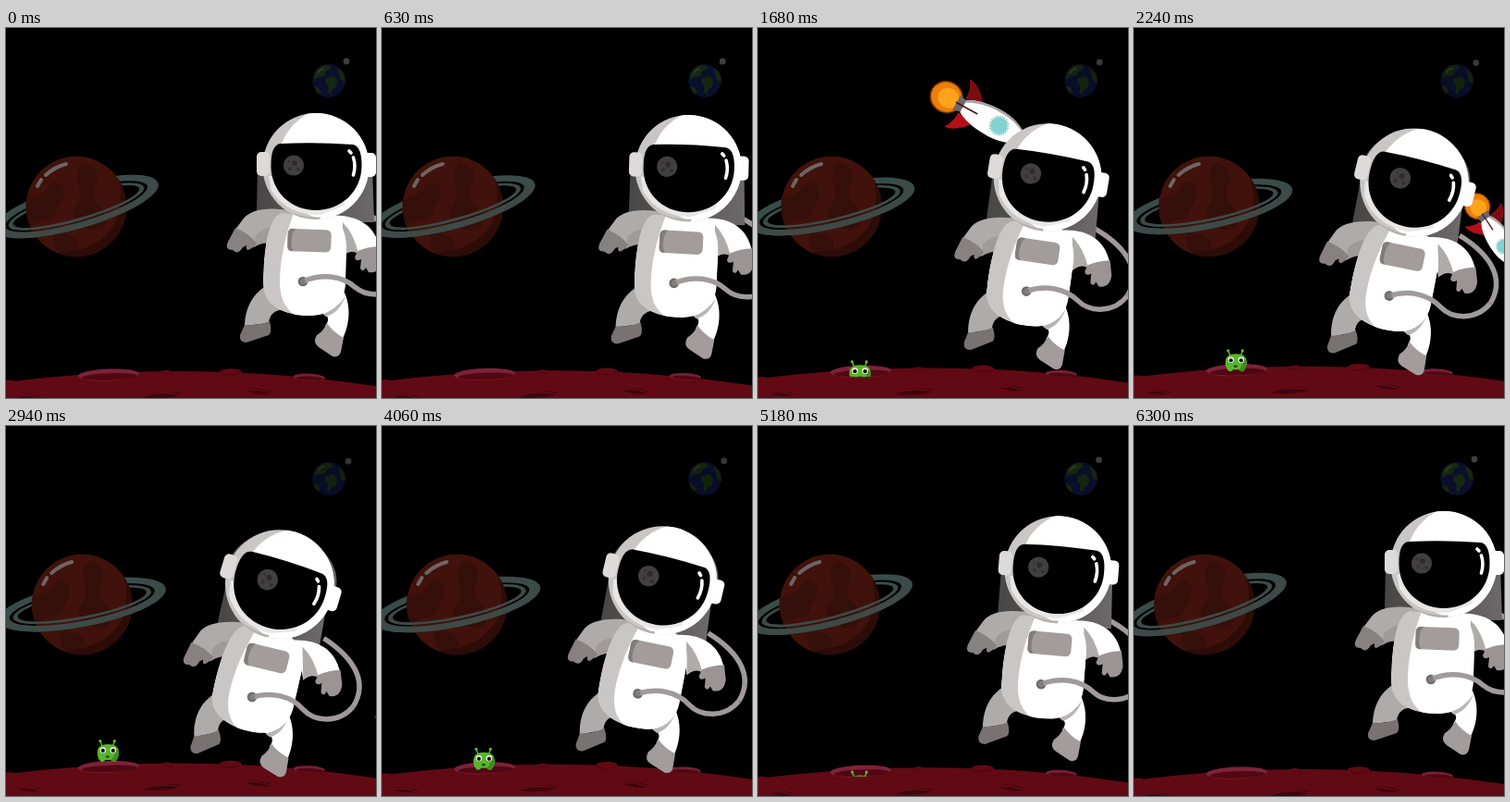
Recreate the animation shown at these times as an HTML page. Size 400 by 400 pixels, loop 6.37 s.

```html
<!DOCTYPE html>
<html lang="en">
<head>
<meta charset="utf-8">
<title>Astronaut</title>
<style>
  html, body { margin: 0; width: 100%; height: 100%; overflow: hidden; background: #000; }
  svg { display: block; width: 100vw; height: 100vh; }
</style>
</head>
<body>
<svg viewBox="0 0 400 400">
  <defs>
    <clipPath id="helmetClip"><circle cx="335" cy="149.5" r="57.5"/></clipPath>
    <clipPath id="torsoClip"><path id="torsoShape" d="M298 200C281 204 278 250 278 277C278 301 301 311 328 311C352 311 367 297 367 274L368 238C368 220 361 207 350 203Z"/></clipPath>
    <clipPath id="globeClip"><circle r="54.5"/></clipPath>
    <clipPath id="earthClip"><circle r="18"/></clipPath>
    <clipPath id="holeClip"><path d="M60 300H160V377H142A30 3.6 0 0 1 82 377H60Z"/></clipPath>
    <clipPath id="frontClip"><path d="M-110 0H110V60H-110Z"/></clipPath>
    <linearGradient id="packFill">
      <stop offset="0" stop-color="#484646"/><stop offset="1" stop-color="#6d6869"/>
    </linearGradient>
    <path id="rings" fill-rule="evenodd" d="M-92 0A92 24 0 0 1 92 0A92 24 0 0 1-92 0ZM-80 0A80 17.5 0 0 0 80 0A80 17.5 0 0 0-80 0ZM-76 0A76 15.5 0 0 1 76 0A76 15.5 0 0 1-76 0ZM-71 0A71 12.8 0 0 0 71 0A71 12.8 0 0 0-71 0Z"/>
  </defs>
  <rect width="400" height="400"/>

  <g id="earth">
    <g clip-path="url(#earthClip)">
      <circle r="18" fill="#0d1236"/>
      <g fill="#1b2f10">
        <path d="M-15-9Q-10-18 0-17L3-13L-3-10L-5-5L-11-4L-16-1Z"/>
        <path d="M-3-3L5-5L9 0L8 7L4 9L2 15L-1 12L0 6L-4 2Z"/>
        <path d="M9-14L17-8L18 2L13-1L11-7Z"/>
        <path d="M-16 6L-10 8L-8 14L-13 14Z"/>
      </g>
      <path d="M-12-8Q-10-12-6-13" fill="none" stroke="#3b4a3b" stroke-width="1.6" stroke-linecap="round"/>
    </g>
    <circle cx="19" cy="-21" r="3.4" fill="#4c4c4c"/>
  </g>

  <g id="planet">
    <use id="ringBack" href="#rings" fill="#3a4c49"/>
    <g clip-path="url(#globeClip)">
      <circle r="54.5" fill="#40120b"/>
      <g fill="#350f0a">
        <path d="M-55-8Q-36-10-30-22Q-22-32-14-20Q-12-8-20 2Q-24 16-36 14L-55 22Z"/>
        <path d="M8-48Q26-42 22-26Q14-14 24-2Q36 8 30 22Q18 30 6 20Q-8 16-2 2Q8-10 2-24Q-2-40 8-48Z"/>
        <path d="M-24 30Q-8 26 2 38Q4 50-10 54Q-26 50-24 30Z"/>
      </g>
      <path d="M32-55Q58-20 42 18Q24 48-20 50V60H60V-55Z" fill="#270a07" opacity=".75"/>
    </g>
    <path d="M-42-22L-38-29M-33-34Q-23-43-11-46" fill="none" stroke="#6c6564" stroke-width="4" stroke-linecap="round"/>
    <g id="ringFront" clip-path="url(#frontClip)"><use href="#rings" fill="#3d4a47"/></g>
  </g>

  <g id="ground">
    <circle cx="185" cy="1816" r="1445" fill="#610a13"/>
    <g fill="#610a13">
      <ellipse cx="4" cy="384.500" rx="9" ry="3.800"/>
      <ellipse cx="243" cy="372" rx="12" ry="3.800"/>
      <ellipse cx="174" cy="372" rx="6" ry="2"/>
    </g>
    <path d="M234 374Q243 377 253 373M169 373.500H179" fill="none" stroke="#490710" stroke-width="1"/>
    <g fill="#3e050b">
      <ellipse cx="169" cy="397" rx="21" ry="3.200" transform="rotate(-4 169 397)"/>
      <ellipse cx="274" cy="393" rx="13" ry="2.800" transform="rotate(7 274 393)"/>
      <ellipse cx="26" cy="399" rx="13" ry="2.400" transform="rotate(4 26 399)"/>
    </g>
    <path d="M149 398Q169 392 190 396.500M262 391Q275 390 286 395M14 398Q26 395.500 38 401" fill="none" stroke="#76101c" stroke-width="1"/>
    <g transform="rotate(-2 111 375)">
      <ellipse cx="111" cy="375" rx="33" ry="6.500" fill="#7d2238"/>
      <ellipse cx="112" cy="377" rx="30" ry="3.800" fill="#510812"/>
    </g>
    <g transform="rotate(3 328 377)">
      <ellipse cx="328" cy="377.500" rx="17" ry="3.800" fill="#762035"/>
      <ellipse cx="329" cy="378.700" rx="15" ry="2.200" fill="#510812"/>
    </g>
    <g clip-path="url(#holeClip)">
      <g id="alien">
        <path d="M-6 8L-8.500 1.500M5 8L7 1.500" stroke="#58b52b" stroke-width="1.500"/>
        <circle cx="-8.500" cy="1.500" r="1.500" fill="#6cc038"/><circle cx="7" cy="1.500" r="1.500" fill="#6cc038"/>
        <path d="M-11.500 13Q-11 5 0 5Q11 5 11.500 13Q12 20 8 23.500Q5 25 3 22L-3 22Q-5 25-8 23.500Q-12 20-11.500 13Z" fill="#58b52b"/>
        <path d="M11.500 13Q12 20 8 23.500Q5 25 3 22Q8 18 8 9Z" fill="#3d8d20"/>
        <circle cx="-5.500" cy="11.500" r="3.300" fill="#e6efe0"/><circle cx="5.500" cy="11.500" r="3.300" fill="#e6efe0"/>
        <circle cx="-5.500" cy="12" r="2.100" fill="#111"/><circle cx="5.500" cy="12" r="2.100" fill="#111"/>
        <ellipse cx="-.5" cy="18.500" rx="2.200" ry="1.300" fill="#1c4a10"/>
      </g>
    </g>
  </g>

  <g id="rocket">
    <ellipse cx="-78" rx="21" ry="20" fill="#ec7f0b" stroke="#8f3a07" stroke-width="2.500" stroke-dasharray="2 1.500"/>
    <ellipse cx="-75" rx="14" ry="13" fill="#ffa31a"/>
    <path d="M-52-8L-63-11V11L-52 8Z" fill="#6d6768"/>
    <path d="M-32-15Q-48-35-62-35Q-54-24-55-10ZM-32 15Q-48 35-62 35Q-54 24-55 10Z" fill="#b30f19"/>
    <path d="M-32-15Q-48-35-62-35Q-54-24-55-10Z" fill="#7b0c14"/>
    <path d="M41 0C28-14 10-19-8-19C-30-19-45-14-53-9V9C-45 14-30 19-8 19C10 19 28 14 41 0Z" fill="#fff"/>
    <path d="M41 0C28-14 10-19-8-19C-30-19-45-14-53-9V-5C-40-13-26-16-8-16C10-16 26-12 41 0Z" fill="#aaa4a5"/>
    <path d="M41 0Q37-4.500 32-7.500Q35 0 32 7.500Q37 4.500 41 0Z" fill="#c4121d"/>
    <path d="M-64 0H-32" stroke="#4d1418" stroke-width="2"/>
    <circle r="11" fill="#82d2d2"/>
    <circle r="12" fill="none" stroke="#6fb4b6" stroke-width="1.800" stroke-dasharray="1.500 1.500"/>
  </g>

  <g id="astronaut">
    <g id="hoseBack"><path d="M430 262C440 236 425 212 384 196" fill="none" stroke="#a09a9b" stroke-width="5.500"/></g>
    <ellipse id="cap" ry="48" fill="url(#packFill)"/>
    <g id="pack"><path d="M272 150H396L398 210H271V196Z" fill="url(#packFill)"/></g>
    <g id="armL">
      <path d="M312 198C286 193 264 195 256 207L247 219L268 237C275 231 281 231 290 234L306 218Z" fill="#b0abab"/>
      <path d="M270 224Q280 214 292 216L290 234Q280 230 268 237Z" fill="#a09a9b"/>
      <path d="M248 216L240 231Q236 240 245 240Q251 246 256 237L260 235Q259 242 264 239Q268 237 271 233Q263 222 248 216Z" fill="#878182"/>
    </g>
    <g id="armR">
      <path d="M350 203C378 201 399 212 404 238L381 244C377 240 372 240 364 246L360 215Z" fill="#fff"/>
      <path d="M364 210Q376 222 381 244Q373 239 364 246Z" fill="#b0abab"/>
      <path d="M404.500 236Q392 236 380 241L377 248Q378 253 384 250L383 260Q386 265 389 259L392 264Q404 266 406 252Z" fill="#9a9495"/>
    </g>
    <g id="legL">
      <path d="M286 276C270 284 259 298 258 322L284 319C285 309 291 304 304 304Z" fill="#b0abab"/>
      <path d="M258 321Q272 322 285 317Q288 329 284 332L260 340Q252 340 253 332Z" fill="#787273"/>
    </g>
    <g id="legR">
      <path d="M338 306L366 286C372 300 373 318 363 338L345 322C350 316 350 310 338 306Z" fill="#fff"/>
      <path d="M341 308Q358 304 367 290Q360 308 346 312Z" fill="#bab5b5"/>
      <path d="M347 319Q343 328 336 332Q331 340 338 345L353 355Q360 357 362 350L365 335Q354 329 347 319Z" fill="#a29c9d"/>
    </g>
    <g clip-path="url(#torsoClip)">
      <use href="#torsoShape" fill="#cbc6c6"/>
      <path d="M312 198C303 220 296 250 296 274C296 296 304 306 318 314H372V198Z" fill="#fff"/>
    </g>
    <g transform="rotate(2 328 229.500)">
      <rect x="304.500" y="217.500" width="47" height="24.500" rx="5.500" fill="#a29c9d"/>
      <path d="M313 217.500H310Q304.500 217.500 304.500 223V236.500Q304.500 242 310 242H311Q308 238 308.500 230Q309 221 313 217.500Z" fill="#827c7d"/>
    </g>
    <circle cx="321" cy="274" r="5.300" fill="#6f696a"/>
    <g id="hoseFront"><path d="M321 274C340 264 362 264 378 276C392 286 418 284 430 262" fill="none" stroke="#a09a9b" stroke-width="5.500"/></g>
    <circle cx="321" cy="274" r="3" fill="#837d7e"/>
    <g id="head">
      <g clip-path="url(#helmetClip)">
        <rect x="275" y="90" width="120" height="120" fill="#cbc6c6"/>
        <circle cx="356" cy="147" r="62" fill="#fff"/>
        <path d="M286 184Q306 206 340 204.500L338 210H280Z" fill="#b4aeaf"/>
        <path d="M287 176Q305 203 340 202L366 192V160H284Z" fill="#e9e6e6"/>
      </g>
      <rect x="271" y="134" width="14" height="26" rx="5" fill="#dedada"/>
      <rect x="386" y="135" width="14" height="26" rx="5" fill="#fff"/>
      <path d="M297 125Q335 123 375 126Q385 128 384.500 150C384 177 362 197 335 197C308 197 287 177 286.500 150Q286 126 297 125Z" fill="#000"/>
      <g id="moon">
        <circle cx="311" cy="148.500" r="11" fill="#413f3f"/>
        <circle cx="312" cy="146" r="3" fill="#2d2b2b"/><circle cx="307" cy="152" r="2" fill="#333131"/>
        <circle cx="316" cy="153" r="1.800" fill="#302e2e"/><circle cx="306" cy="144" r="1.400" fill="#353333"/>
      </g>
      <path d="M371 133L373 135M375.500 140Q378.500 149 375.500 159" fill="none" stroke="#fff" stroke-width="3.600" stroke-linecap="round"/>
    </g>
  </g>
</svg>
<script>
  const LOOP = 6370, STEP = 70, SWAY = 6270, ROCKET_END = 3150;
  const parts = {};
  document.querySelectorAll('g[id], ellipse[id], use[id]').forEach(el => parts[el.id] = el);
  const set = (id, name, value) => parts[id].setAttribute(name, value);
  const move = (id, value) => set(id, 'transform', value);
  const rad = deg => deg * Math.PI / 180;

  // Rocket knots: progress, x, y, heading
  const route = [[0, -125, 205, -34], [.283, 75, 90, -24], [.81, 399, 235, 56], [1, 424, 351, 80]];
  const SPEED = 740;

  function along(p) {
    let i = 0;
    while (i < route.length - 2 && p > route[i + 1][0]) i++;
    const a = route[i], b = route[i + 1], span = b[0] - a[0];
    const u = (p - a[0]) / span, v = 1 - u, m = span * SPEED;
    const mix = (k, trig) =>
      a[k] * (1 + 2 * u) * v * v + b[k] * u * u * (3 - 2 * u) +
      m * (trig(rad(a[3])) * u * v * v - trig(rad(b[3])) * u * u * v);
    return [mix(1, Math.cos), mix(2, Math.sin)];
  }

  function drawRocket(t, p) {
    const show = t > 300 && t < ROCKET_END;
    set('rocket', 'visibility', show ? 'visible' : 'hidden');
    if (!show) return;
    const [x, y] = along(p), [x0, y0] = along(p - .002), [x1, y1] = along(p + .002);
    const turn = Math.atan2(y1 - y0, x1 - x0) * 180 / Math.PI;
    const size = Math.min(1.05, 1.18 - .63 * p);
    move('rocket', `translate(${x} ${y}) rotate(${turn}) scale(${size})`);
  }

  function draw(t) {
    const p = (1 - Math.cos(2 * Math.PI * t / SWAY)) / 2;

    move('earth', `translate(349 57) rotate(${6 * p})`);
    set('earth', 'opacity', .85 - .15 * p);
    move('planet', `translate(${76 + 6.3 * p} 193)`);
    const tilt = `rotate(${-16 + 5 * p})`;
    move('ringBack', tilt);
    move('ringFront', tilt);

    move('ground', `translate(0 ${-6.5 * p})`);
    move('alien', `translate(110.3 ${385 - 40 * p})`);
    drawRocket(t, p);

    move('astronaut', `translate(${-55.5 * p} ${19.2 * p}) rotate(${11.8 * p} 321 274)`);
    move('head', `translate(${335 - 9.5 * p} ${149 - p}) rotate(${5 * p}) scale(${1 + .025 * p}) translate(-335 -149)`);
    move('moon', `translate(${10.5 * p} 0)`);
    move('pack', `translate(270 0) scale(${1 - .11 * p} 1) translate(${-270 - 3 * p} 0)`);
    set('cap', 'cx', 334 - 8 * p);
    set('cap', 'cy', 149 - 8 * p);
    set('cap', 'rx', 56 + 4 * p);

    move('armL', `translate(${-7 * p} ${2 * p}) rotate(${-14 * p} 297 207)`);
    move('armR', `rotate(${-13 * p} 362 213)`);
    move('legL', `rotate(${-17 * p} 287 290)`);
    move('legR', `rotate(${-14 * p} 350 300)`);
    const swing = `rotate(${4.5 * (1 - p)} 321 274)`;
    move('hoseBack', swing);
    move('hoseFront', swing);
  }

  const start = performance.now();
  function tick() {
    const t = (performance.now() - start) % LOOP;
    draw(Math.floor(t / STEP) * STEP);
    requestAnimationFrame(tick);
  }
  tick();
</script>
</body>
</html>
```
